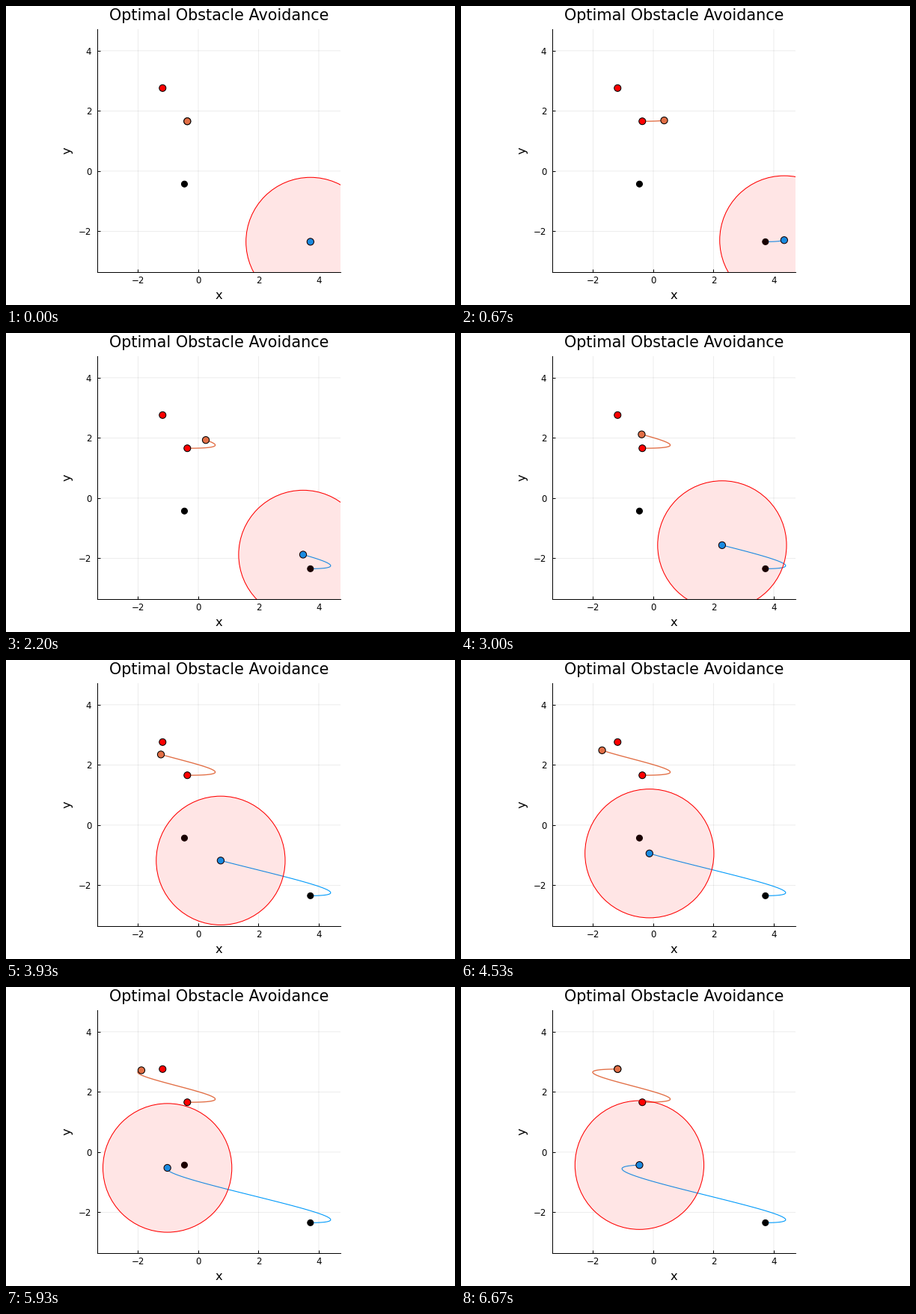
These frames come from a looping animation (600x400 px, 6740 ms). A matplotlib script:

```python
import matplotlib.pyplot as plt
import numpy as np
from matplotlib.animation import FuncAnimation
from matplotlib.patches import Circle

W, H, DPI = 600, 400, 100
LOOP, TICK = 6740, 20       # ms
STEPS, RATE = 100, 0.015    # poses per run, poses per ms
SCALE = 40.25               # pixels per unit
BLUE, ORANGE = "#009AFA", "#E26F46"
RADIUS = 2.14


def pt(px):
    return px * 72 / DPI


def glide(start, end, drift=((0, 0), (0, 0))):
    """Double-integrator path entering and leaving at ten units per run in x."""
    start, end, base, slope = map(np.array, (start, end, *drift))
    t = np.linspace(0, 1, STEPS + 1)[:, None]
    bump = t * (1 - t)
    cruise = np.array([10, 0])
    speed = cruise + bump * (end - start - cruise) * STEPS / bump.sum()
    moved = np.cumsum(speed[:-1], axis=0) / STEPS
    path = start + np.vstack([[0, 0], moved])
    return path + bump * (base + slope * t)


runner = glide((-0.365, 1.657), (-1.185, 2.76))
mover = glide((3.723, -2.348), (-0.46, -0.43), ((-0.26, 0.10), (0.46, -0.385)))

plt.rcParams["font.family"] = "DejaVu Sans"
fig = plt.figure(figsize=(W / DPI, H / DPI), dpi=DPI, facecolor="white")
ax = fig.add_axes([122.3 / W, 1 - 355.6 / H, 325 / W, 325 / H])
ax.set(xlim=(-3.346, 4.729), ylim=(-3.347, 4.728),
       xticks=[-2, 0, 2, 4], yticks=[-2, 0, 2, 4])
ax.set_axisbelow(True)
ax.grid(color="black", alpha=0.1, lw=pt(0.7), snap=False)
ax.spines[["top", "right"]].set_visible(False)
ax.spines[["left", "bottom"]].set_linewidth(pt(1))
ax.tick_params(direction="in", length=pt(3.6), width=pt(1), labelsize=pt(11.8))
ax.tick_params(axis="x", pad=pt(5.8))
ax.tick_params(axis="y", pad=pt(8))


def label(x, y, text, size, **kw):
    fig.text(x / W, 1 - y / H, text, fontsize=pt(size), ha="center", **kw)


label(284.7, 19.2, "Optimal Obstacle Avoidance", 20.8, va="baseline")
label(284.7, 392, "x", 16.3, va="baseline")
label(82.5, 193, "y", 16.3, va="center", rotation=90)


def disc(pos, radius, fill, edge, z):
    return ax.add_patch(Circle(pos, radius, fc=fill, ec=edge, lw=pt(1.05), zorder=z))


def dot(pos, color, px, z):
    return disc(pos, px / SCALE, color, "black", z)


for path, color, px in ((runner, "red", 4.5), (mover, "black", 4)):
    for pos in path[[0, -1]]:
        dot(pos, color, px, 4)

agents = []
for path, color, width in ((runner, ORANGE, 1.35), (mover, BLUE, 1.1)):
    trail, = ax.plot([], [], color=color, lw=pt(width), zorder=3)
    agents.append((path, trail, dot(path[0], color, 4.6, 5)))

# The white disc hides the grid below the danger zone.
zone = [disc(mover[0], RADIUS, "white", "none", 2),
        disc(mover[0], RADIUS, (1, 0, 0, 0.1), "red", 6)]


def draw(frame):
    k = min(STEPS, int((frame * TICK + 15) * RATE))
    for path, trail, head in agents:
        trail.set_data(*path[:k + 1].T)
        head.center = path[k]
    for part in zone:
        part.center = mover[k]
    return zone


anim = FuncAnimation(fig, draw, frames=LOOP // TICK, interval=TICK,
                     init_func=lambda: draw(0), repeat=True, repeat_delay=0)
plt.show()
```
